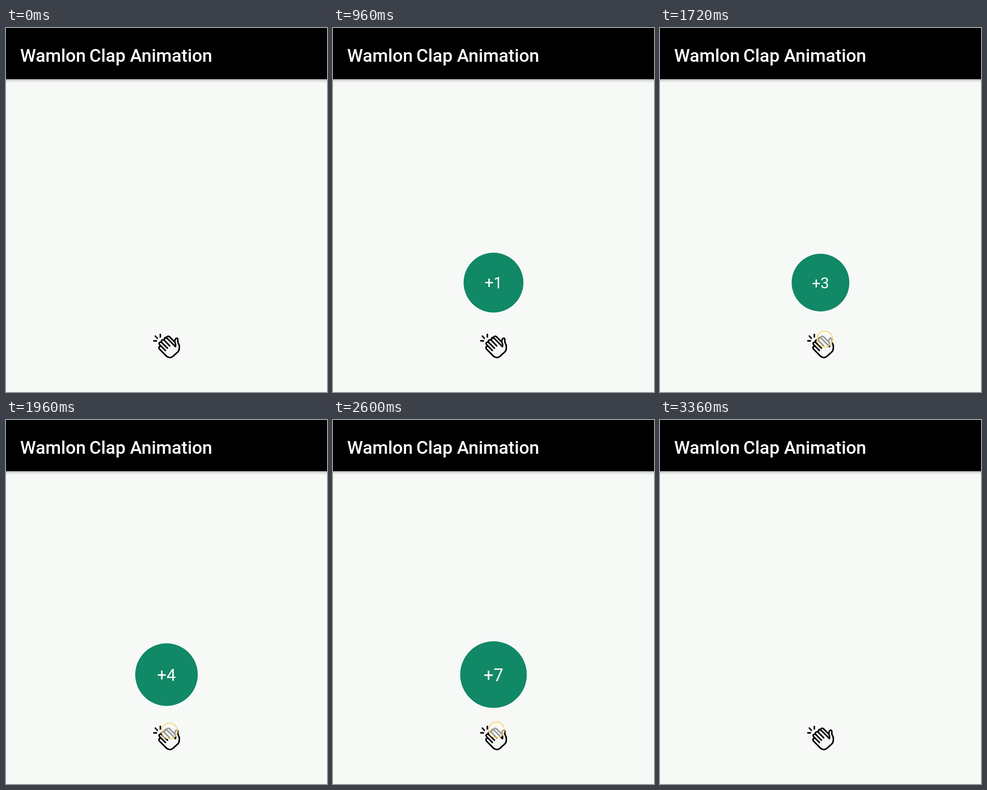
These frames come from a looping animation (703 px wide and 797 px high, 5720 ms). An HTML page:

```html
<!DOCTYPE html>
<html lang="en">
<head>
<meta charset="utf-8">
<title>Clap Animation</title>
<style>
  html, body { margin: 0; width: 100%; height: 100%; overflow: hidden; background: #f7f9f7; }
  svg { display: block; }
  text { font-family: Roboto, sans-serif; fill: #fff; }
  .title { font-size: 39.35px; font-weight: 500; }
  .count { font-size: 28.8px; text-anchor: middle; }
  .hand { fill: none; stroke: #000; stroke-width: 3.3; stroke-linecap: round; stroke-linejoin: round; }
</style>
</head>
<body>
<svg width="703" height="797" viewBox="0 0 703 797">
  <defs>
    <linearGradient id="shade" x2="0" y2="1">
      <stop offset="0" stop-color="#000" stop-opacity=".3"/>
      <stop offset=".45" stop-color="#000" stop-opacity=".1"/>
      <stop offset="1" stop-color="#000" stop-opacity="0"/>
    </linearGradient>
  </defs>
  <rect width="703" height="797" fill="#f7f9f7"/>
  <rect y="112" width="703" height="8" fill="url(#shade)"/>
  <rect width="703" height="112" fill="#000"/>
  <g class="title">
    <text x="31" y="74">Wamlon</text>
    <text x="182.6" y="74">Clap Animation</text>
  </g>

  <g class="hand">
    <!-- sparks -->
    <path d="M323.7 685H329.5M327 674.5L331.5 679.5M338 671V676.5"/>
    <!-- fingers -->
    <path d="M351.5 718.5L336 702.8Q334 699.5 336 697.3Q338.5 695.5 341 698L349 706"/>
    <path d="M341 698L336.5 693.5Q334 690.5 336.5 688.5Q339 687 341.5 689L353.5 701"/>
    <path d="M341.5 689Q339 685.5 341.5 683.5Q344.5 681.5 347 684L358.5 696"/>
    <path d="M347 684Q345.5 680.5 348.5 679Q351.5 678 354 680.5L371 697.5"/>
    <!-- palm and thumb -->
    <path d="M351.5 718.5Q358.5 724.5 365.5 719L376.5 709Q379.5 706 379.5 701V695L376.3 687.5V681.5Q375.5 678 372.5 679.5Q370 681.5 369.5 687.5Q372.5 692 371 697.5"/>
    <!-- rear hand -->
    <path d="M347 680.5Q347.5 676.5 351.5 677.5Q354 673.5 358 676L369.5 687.5"/>
  </g>

  <g id="badge">
    <circle r="54.5" fill="#118866"/>
    <text id="count" class="count" y="10.8"></text>
  </g>
  <circle id="touch" r="17.3" fill="#fbfbf9" fill-opacity=".62" stroke="#f8d672" stroke-width="2"/>
</svg>

<script>
  const LOOP = 5720, STEP = 40, REST = 109;
  const badge = document.getElementById('badge');
  const count = document.getElementById('count');
  const touch = document.getElementById('touch');

  // Each tap: finger down, finger up, moment the counter rises, finger position
  const taps = [
    { down: 720, up: 850, score: 820, x: 347, y: 706 },
    { down: 1400, up: 1500, score: 1440, x: 360, y: 682 },
    { down: 1640, up: 1750, score: 1690, x: 361, y: 681 },
    { down: 1880, up: 1990, score: 1930, x: 358, y: 681 },
    { down: 2120, up: 2230, score: 2160, x: 357, y: 681 },
    { down: 2330, up: 2430, score: 2370, x: 357, y: 682 },
    { down: 2540, up: 2650, score: 2580, x: 358, y: 678.5 },
  ];

  // Badge diameter over time
  const sizes = [
    [820, REST], [960, 131], [1160, REST], [1430, REST], [1560, 135], [1680, 118],
    [1800, 143], [1920, 130], [2040, 151], [2140, 140], [2220, 153], [2340, 139],
    [2440, 152], [2550, 137], [2640, 153], [3000, REST],
  ];

  const clamp = v => Math.min(1, Math.max(0, v));
  const progress = (t, start, end) => clamp((t - start) / (end - start));

  function diameter(t) {
    const next = sizes.findIndex(([time]) => time > t);
    if (next < 1) return REST;
    const [t0, d0] = sizes[next - 1], [t1, d1] = sizes[next];
    return d0 + (d1 - d0) * progress(t, t0, t1);
  }

  function draw(t) {
    const enter = progress(t, 820, 960);
    const leave = progress(t, 3260, 3350);
    const y = 557.5 + 120 * (1 - enter) - 51 * leave;
    badge.setAttribute('transform', `translate(351.5 ${y}) scale(${diameter(t) / REST})`);
    badge.setAttribute('opacity', enter * (1 - leave));
    count.textContent = '+' + taps.filter(tap => t >= tap.score).length;

    const tap = taps.find(({ down, up }) => t >= down && t < up);
    touch.setAttribute('visibility', tap ? 'visible' : 'hidden');
    if (tap) {
      touch.setAttribute('cx', tap.x);
      touch.setAttribute('cy', tap.y);
    }
  }

  const start = performance.now();
  function tick() {
    const t = (performance.now() - start) % LOOP;
    draw(Math.floor(t / STEP) * STEP);
    requestAnimationFrame(tick);
  }
  tick();
</script>
</body>
</html>
```
